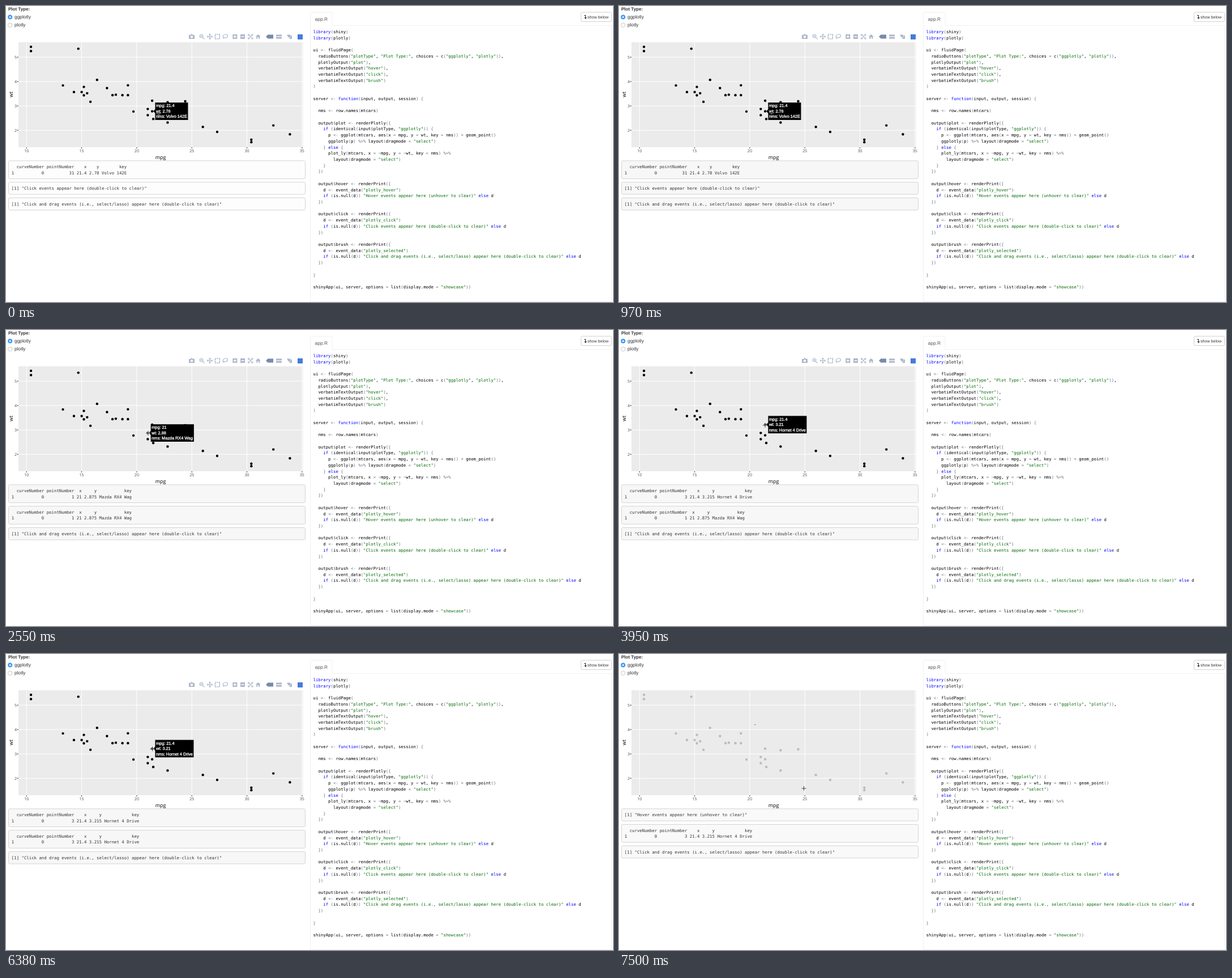
Recreate the animation shown at these times as an HTML page. Size 1072 by 522 pixels, loop 8 s.

```html
<!DOCTYPE html>
<html lang="en">
<head>
<meta charset="utf-8">
<title>Linked plot events</title>
<style>
  html, body { margin: 0; width: 100%; height: 100%; overflow: hidden; background: #fff; }
  svg { display: block; }
  text { white-space: pre; text-rendering: geometricPrecision; }
  .sans { font: 8.4px "Liberation Sans", Arial, sans-serif; fill: #333; }
  .mono { font: 7.35px "DejaVu Sans Mono", monospace; fill: #000; }
  .out { fill: #333; }
  .axis { font: 7.1px "Open Sans", sans-serif; fill: #4d4d4d; }
  .title { font: 8.9px "Open Sans", sans-serif; fill: #000; }
  .tip { font: 7.3px "Liberation Sans", Arial, sans-serif; fill: #fff; stroke: #fff; stroke-width: .3; }
  .kw { fill: #00f; }
  .str { fill: #036a07; }
  .op { fill: #687687; }
  #bar path { fill: none; stroke: #001f5f; stroke-width: 1.2; opacity: .32; }
  #bar .solid { fill: #001f5f; stroke: none; }
  #bar .on { opacity: .52; }
</style>
</head>
<body>
<svg width="1072" height="522" viewBox="0 0 1072 522">
  <text class="sans" x="4" y="8" style="font-size:8px;font-weight:bold">Plot Type:</text>
  <circle cx="7.2" cy="19.6" r="4" fill="#3b99fc"/>
  <circle cx="7.2" cy="19.6" r="1.5" fill="#fff"/>
  <circle cx="7.2" cy="33.7" r="3.7" fill="#fff" stroke="#b8b8b8" stroke-width=".8"/>
  <text class="sans" x="15" y="22.3">ggplotly</text>
  <text class="sans" x="15" y="36.4">plotly</text>

  <path d="M537.5 521.5V13.5q0-2.5 2.5-2.5H573.5q2.5 0 2.5 2.5V34.5H1069.5V521.5Z" fill="none" stroke="#f0f0f0"/>
  <text class="sans" x="545.6" y="25.6" style="fill:#555">app.R</text>
  <rect x="1015.5" y="11" width="54" height="16.5" rx="2.5" fill="#fff" stroke="#d0d0d0"/>
  <path d="M1021 16.5H1023.5V21.5M1021.7 20L1023.5 22.3L1025.3 20" fill="none" stroke="#333" stroke-width="1.1"/>
  <text class="sans" x="1027" y="21.8" style="font-size:7.1px">show below</text>
  <g id="code"></g>

  <g id="plot"></g>
  <g id="bar"></g>
  <g id="dots"></g>
  <g id="wells"></g>
  <g id="live"></g>
</svg>

<script>
const CODE = String.raw`library(shiny)
library(plotly)

ui <- fluidPage(
  radioButtons("plotType", "Plot Type:", choices = c("ggplotly", "plotly")),
  plotlyOutput("plot"),
  verbatimTextOutput("hover"),
  verbatimTextOutput("click"),
  verbatimTextOutput("brush")
)

server <- function(input, output, session) {

  nms <- row.names(mtcars)

  output$plot <- renderPlotly({
    if (identical(input$plotType, "ggplotly")) {
      p <- ggplot(mtcars, aes(x = mpg, y = wt, key = nms)) + geom_point()
      ggplotly(p) %>% layout(dragmode = "select")
    } else {
      plot_ly(mtcars, x = ~mpg, y = ~wt, key = nms) %>%
        layout(dragmode = "select")
    }
  })

  output$hover <- renderPrint({
    d <- event_data("plotly_hover")
    if (is.null(d)) "Hover events appear here (unhover to clear)" else d
  })

  output$click <- renderPrint({
    d <- event_data("plotly_click")
    if (is.null(d)) "Click events appear here (double-click to clear)" else d
  })

  output$brush <- renderPrint({
    d <- event_data("plotly_selected")
    if (is.null(d)) "Click and drag events (i.e., select/lasso) appear here (double-click to clear)" else d
  })

}

shinyApp(ui, server, options = list(display.mode = "showcase"))`;

const $ = id => document.getElementById(id);
const esc = s => s.replace(/&/g, '&amp;').replace(/</g, '&lt;').replace(/>/g, '&gt;');
const text = (cls, x, y, s, extra = '') => `<text class="${cls}" x="${x}" y="${y}" ${extra}>${s}</text>`;
const line = (d, color, w = 1) => `<path d="${d}" fill="none" stroke="${color}" stroke-width="${w}"/>`;

// Code listing with syntax colours
const TOKENS = /("[^"]*")|\b(library|function|if|else)\b|(<-|%>%|[=~+$(){}]+)|[\w.]+|[^\w.]/g;
const paint = s => s.replace(TOKENS, (m, str, kw, op) => {
  const cls = str ? 'str' : kw ? 'kw' : op ? 'op' : '';
  return cls ? `<tspan class="${cls}">${esc(m)}</tspan>` : esc(m);
});
$('code').innerHTML = CODE.split('\n')
  .map((s, i) => text('mono', 542.6, 48.1 + i * 10.71, paint(s))).join('');

// Scatter plot
const px = mpg => 36.3 + (mpg - 10) * 19.46;
const py = wt => 219.2 - (wt - 2) * 43;
const CARS = [
  [21, 2.62], [21, 2.875], [22.8, 2.32], [21.4, 3.215], [18.7, 3.44], [18.1, 3.46], [14.3, 3.57], [24.4, 3.19],
  [22.8, 3.15], [19.2, 3.44], [17.8, 3.44], [16.4, 4.07], [17.3, 3.73], [15.2, 3.78], [10.4, 5.25], [10.4, 5.424],
  [14.7, 5.345], [32.4, 2.2], [30.4, 1.615], [33.9, 1.835], [21.5, 2.465], [15.5, 3.52], [15.2, 3.435], [13.3, 3.84],
  [19.2, 3.845], [27.3, 1.935], [26, 2.14], [30.4, 1.513], [15.8, 3.17], [19.7, 2.77], [15, 3.57], [21.4, 2.78]
];
let plot = '<rect x="22" y="64" width="502.5" height="185" fill="#ebebeb"/>';
for (let v = 10; v <= 35; v += 5) {
  const x = px(v);
  plot += line(`M${x} 64V249`, '#fff') + line(`M${x} 249v2.3`, '#333') +
    text('axis', x, 257.6, v, 'text-anchor="middle"');
}
for (let v = 2; v <= 5; v++) {
  const y = py(v);
  plot += line(`M22 ${y}H524.5`, '#fff') + line(`M19.5 ${y}h2.5`, '#333') +
    text('axis', 19, y + 2.9, v, 'text-anchor="end"');
}
plot += text('title', 273, 270.4, 'mpg', 'text-anchor="middle"') +
  text('title', 0, 0, 'wt', 'text-anchor="middle" transform="translate(12.4 156) rotate(-90)"');
$('plot').innerHTML = plot;
$('dots').innerHTML = CARS.map(([m, w]) => `<circle cx="${px(m)}" cy="${py(w)}" r="2.2"/>`).join('');

// Toolbar icons, each drawn around its own centre
const box = 'M-4 -4H4V4H-4Z';
const ICONS = [
  [328, 'M-5 -3H-2L-1 -4.5H1L2 -3H5V4H-5ZM0 -1.8A2.2 2.2 0 1 0 .01 -1.8Z', 'solid" fill-rule="evenodd'],
  [346, 'M-1 -4A3 3 0 1 0 -.99 -4ZM1.3 1.3L4.5 4.5M-2.5 -1H.5M-1 -2.5V.5'],
  [360, 'M-4.5 0H4.5M0 -4.5V4.5M-1.5 -3L0 -4.5L1.5 -3M-1.5 3L0 4.5L1.5 3M-3 -1.5L-4.5 0L-3 1.5M3 -1.5L4.5 0L3 1.5'],
  [373.3, box, 'on" stroke-dasharray="2 1.2'],
  [387, 'M-2 2C-6 0 -3 -4 1 -4C6 -4 5 1 1 2C-1 2.5 -4 1 -3 4'],
  [404.3, box + 'M-2.5 -.7V.7H-.7V2.5H.7V.7H2.5V-.7H.7V-2.5H-.7V-.7Z', 'solid" fill-rule="evenodd'],
  [418, box + 'M-2.5 -.7V.7H2.5V-.7Z', 'solid" fill-rule="evenodd'],
  [431.7, 'M-4 -1.5V-4H-1.5M1.5 -4H4V-1.5M4 1.5V4H1.5M-1.5 4H-4V1.5M-3 -3L3 3M3 -3L-3 3'],
  [445.3, 'M-4.5 0L0 -4L4.5 0H3V4H1V1H-1V4H-3V0Z', 'solid'],
  [465.5, 'M-6.5 0L-3 -3.5H6.5V3.5H-3Z', 'solid on'],
  [482, 'M-5 -3.5H5V-.6H-5ZM-5 .8H5V3.7H-5Z', 'solid'],
  [500.5, 'M-4.5 -3.5H1.5V1H-2ZM-1.5 1.5H2V-2H4.5V4H1Z', 'solid']
];
$('bar').innerHTML = ICONS.map(([x, d, cls = '']) =>
  `<path transform="translate(${x} 54)" d="${d}" class="${cls}"/>`).join('') +
  '<rect x="515" y="50" width="9" height="9" fill="#447bdc"/>';

// Hoverable cars: row index, name, x, y as printed, y as labelled, label width
const volvo = { n: 31, name: 'Volvo 142E', x: '21.4', y: '2.78', wt: '2.78', w: 58 };
const mazda = { n: 1, name: 'Mazda RX4 Wag', x: '21', y: '2.875', wt: '2.88', w: 76.2 };
const hornet = { n: 3, name: 'Hornet 4 Drive', x: '21.4', y: '3.215', wt: '3.21', w: 68 };

const table = c => {
  const row = (a, b, d, x, y, key) => [a, b.padStart(11), d.padStart(11), x.padStart(c.x.length),
    y.padStart(c.y.length), key.padStart(c.name.length)].join(' ');
  return [row(' ', 'curveNumber', 'pointNumber', 'x', 'y', 'key'), row('1', '0', String(c.n), c.x, c.y, c.name)];
};

const wells = s => {
  let y = 272.9;
  return [
    s.row ? table(s.row) : ['[1] "Hover events appear here (unhover to clear)"'],
    s.click ? table(s.click) : ['[1] "Click events appear here (double-click to clear)"'],
    ['[1] "Click and drag events (i.e., select/lasso) appear here (double-click to clear)"']
  ].map((rows, i) => {
    const h = 11.3 + rows.length * 10.2;
    const html = `<rect x="4.5" y="${y}" width="524" height="${h}" rx="2.5" fill="${s.tint}" stroke="#d0d0d0" stroke-width=".9"/>` +
      rows.map((r, k) => text('mono out', 9.8, y + 13.4 + k * 10.2, r, i || !s.stale ? '' : 'opacity=".4"')).join('');
    y += h + 6.1;
    return html;
  }).join('');
};

const label = c => {
  const x = px(+c.x), y = py(+c.y), left = x + 5.3;
  return `<path d="M${x + 2} ${y}L${left} ${y - 3.6}V${y - 15.4}h${c.w}v30.8H${left}V${y + 3.6}Z"/>` +
    [`mpg: ${c.x}`, `wt: ${c.wt}`, `nms: ${c.name}`]
      .map((s, i) => text('tip', left + 1.6, y - 7.3 + i * 9.5, s)).join('');
};

const cross = (x, y) => {
  const d = `M${x - 4} ${y}h8M${x} ${y - 4}v8`;
  return `<g opacity=".7">${line(d, '#fff', 2)}</g>` + line(d, '#222', 0.9);
};

// Each step changes only the named parts of the state
const STEPS = [
  { t: 0, at: [269.5, 189.5], tip: volvo, row: volvo, tint: '#fdfdfd' },
  { t: 140, at: [273, 188] },
  { t: 530, tip: null, row: null, tint: '#fafafa' },
  { t: 830, at: [269.5, 187.5] },
  { t: 970, tip: volvo, row: volvo, tint: '#f7f7f7' },
  { t: 1300, at: [252, 182.5], tip: mazda, stale: true },
  { t: 1660, at: [251, 182], row: mazda, stale: false },
  { t: 2550, click: mazda },
  { t: 3300, at: [252, 180] },
  { t: 3450, at: [256, 173.5] },
  { t: 3600, at: [258.5, 169], tip: hornet, row: hornet },
  { t: 3950, at: [258, 168] },
  { t: 4880, click: hornet },
  { t: 6380, at: [258.5, 167.5] },
  { t: 6540, at: [266, 152.5] },
  { t: 6730, at: [265.5, 137], tip: null, row: null, tint: '#f9f9f9' },
  { t: 6910, at: [253, 130] },
  { t: 7060, at: [242, 126] },
  { t: 7210, at: [240.5, 125] },
  { t: 7500, at: [326.5, 237], brush: true }
];
const LOOP = 8000;
let shown = -1;

function draw(now) {
  const t = now % LOOP;
  const n = STEPS.filter(s => s.t <= t).length;
  if (n !== shown) {
    shown = n;
    const s = Object.assign({}, ...STEPS.slice(0, n));
    $('wells').innerHTML = wells(s);
    $('dots').setAttribute('opacity', s.brush ? 0.2 : 1);
    $('bar').setAttribute('opacity', s.brush ? 0 : 1);
    $('live').innerHTML = (s.tip ? label(s.tip) : '') + cross(...s.at) +
      (s.brush ? '<rect x="239.7" y="124" width="1.2" height="1.2" fill="#222"/>' : '');
  }
  requestAnimationFrame(draw);
}
draw(performance.now());
</script>
</body>
</html>
```
